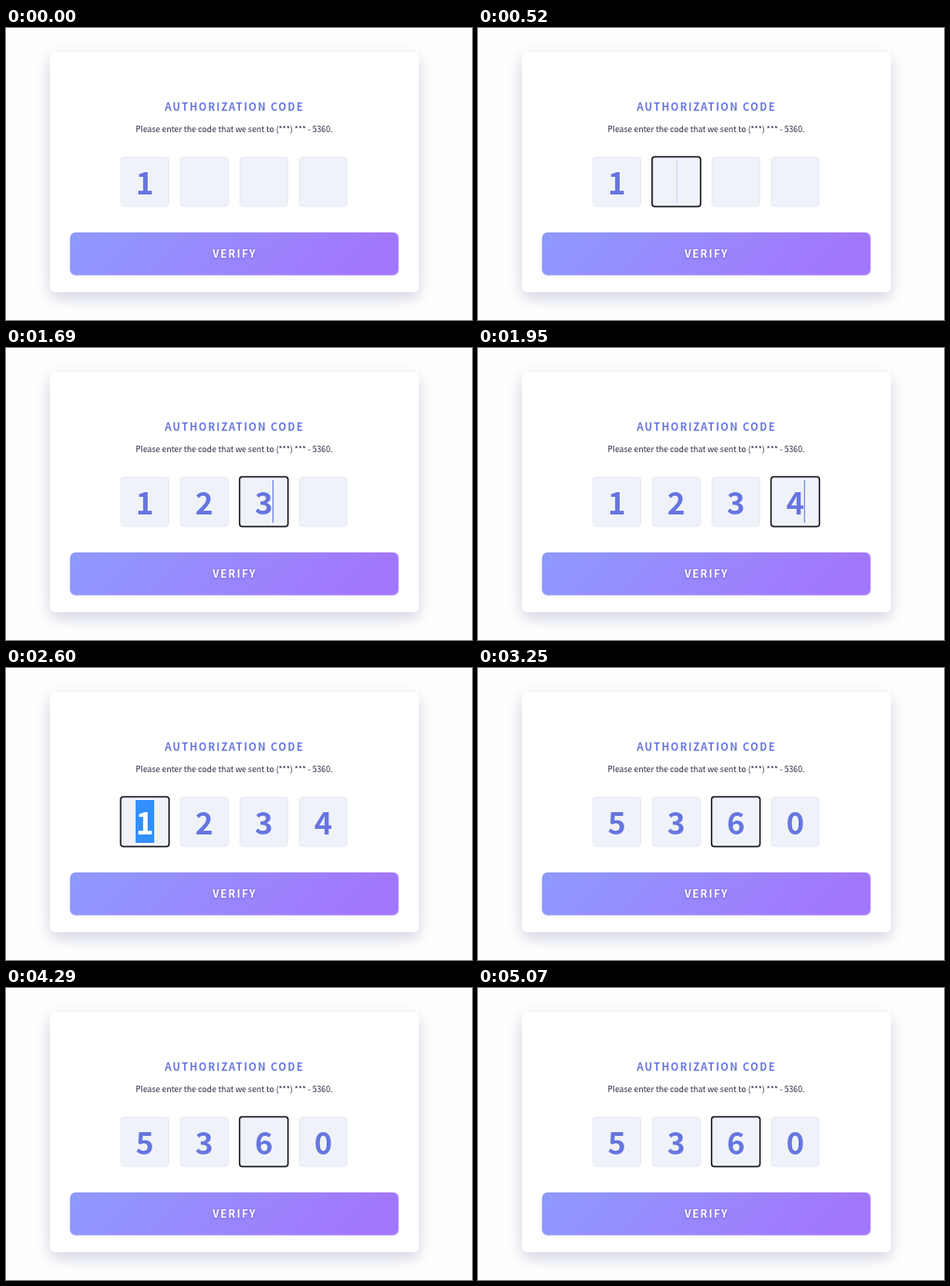
These frames come from a looping animation (500x314 px, 5.2 s). An HTML page:

```html
<!DOCTYPE html>
<html lang="en">
<head>
<meta charset="utf-8">
<title>Authorization code</title>
<style>
  html, body { margin: 0; width: 100%; height: 100%; overflow: hidden; background: #fefefe; }
  svg { display: block; width: 500px; height: 314px; }
  text { font-family: "Noto Sans CJK SC", "Noto Sans CJK JP", "Noto Sans CJK", "Open Sans", sans-serif; text-anchor: middle; }
  .card { fill: #fff; filter: drop-shadow(0 7px 8px rgba(50, 60, 130, .15)) drop-shadow(0 3px 9px rgba(50, 60, 130, .08)); }
  .title { font-size: 11px; font-weight: 700; letter-spacing: 1.5px; fill: #6675df; }
  .hint { font-size: 8.7px; fill: #2b2941; }
  .verify { font-size: 11px; font-weight: 900; letter-spacing: 1.65px; fill: #fff; filter: drop-shadow(0 1px 1px rgba(40, 30, 120, .35)); }
  .button { filter: drop-shadow(0 1px 1px rgba(80, 70, 180, .15)); }
  .box { fill: #eff3f9; stroke: #e3e8f1; }
  .focus .box { stroke: #121218; stroke-width: 1.5; }
  .digit { font-size: 32.8px; font-weight: 900; fill: #6675df; }
  .caret { fill: #6675df; }
  .selection { fill: #338fff; visibility: hidden; }
  .selected .selection { visibility: visible; }
  .selected .digit { fill: #fff; }
</style>
</head>
<body>
<svg viewBox="0 0 500 314">
  <defs>
    <linearGradient id="violet" x1="0" y1="0" x2="1" y2=".12">
      <stop offset="0" stop-color="#8e9aff"/>
      <stop offset="1" stop-color="#a376fc"/>
    </linearGradient>
  </defs>
  <rect class="card" x="47" y="26" width="396" height="258" rx="6"/>
  <text class="title" x="245.2" y="89">AUTHORIZATION CODE</text>
  <text class="hint" x="244.7" y="111.5">Please enter the code that we sent to (***) *** - 5360.</text>
  <g id="boxes"></g>
  <rect class="button" x="68.7" y="219.7" width="352.5" height="46" rx="6" fill="url(#violet)"/>
  <text class="verify" x="245.3" y="247">VERIFY</text>
  <path id="pointer" d="M0 0V10L2.3 8L4 11.2L5.5 10.4L4 7.4H7Z" fill="#fff" stroke="#62607a" stroke-width=".8"/>
</svg>
<script>
const LOOP = 5200, TICK = 130;

// Start time, entered code, focused box, caret opacity, whether the digit is selected
const states = [
  [0, "1", -1, 0],
  [130, "1", 1, 0],
  [260, "1", 1, 1],
  [520, "1", 1, 0.25],
  [1170, "12", 1, 1],
  [1430, "12", 2, 1],
  [1690, "123", 2, 1],
  [1820, "123", 3, 1],
  [1950, "1234", 3, 1],
  [2470, "1234", 0, 0],
  [2600, "1234", 0, 0, true],
  [3250, "5360", 2, 0],
  [3380, "5360", 2, 1],
  [3900, "5360", 2, 0],
  [4550, "5360", 2, 1],
  [5070, "5360", 2, 0]
];
const pointerMove = { start: 3900, end: 4290, x: 267, y: 210, dx: 2, dy: 44 };

const pointer = document.getElementById("pointer");

function add(parent, tag, attributes) {
  const node = document.createElementNS("http://www.w3.org/2000/svg", tag);
  for (const key in attributes) node.setAttribute(key, attributes[key]);
  return parent.appendChild(node);
}

const boxes = [0, 1, 2, 3].map(i => {
  const center = 149 + i * 63.8;
  const group = add(document.getElementById("boxes"), "g", {});
  const frame = add(group, "rect", { class: "box", rx: 3 });
  add(group, "rect", { class: "selection", x: center - 10, y: 142, width: 20, height: 46 });
  const digit = add(group, "text", { class: "digit", x: center, y: 178.5 });
  const caret = add(group, "rect", { class: "caret", y: 142, width: 1, height: 46 });
  return { center, group, frame, digit, caret };
});

function drawBox(box, digit, focused, caretOpacity, selected) {
  const { center, group, frame, caret } = box;
  const grow = focused ? 0.5 : 0;
  group.setAttribute("class", (focused ? "focus" : "") + (selected ? " selected" : ""));
  frame.setAttribute("x", center - 25.5 - grow);
  frame.setAttribute("y", 139 - grow);
  frame.setAttribute("width", 51 + 2 * grow);
  frame.setAttribute("height", 52.5 + 2 * grow);
  box.digit.textContent = digit;
  caret.setAttribute("x", center + (digit ? 9.4 : 0));
  caret.setAttribute("opacity", focused ? caretOpacity : 0);
}

function draw(now) {
  const time = now % LOOP;
  const [, code, focus, caret, selected] = states.filter(state => state[0] <= time).pop();
  boxes.forEach((box, i) =>
    drawBox(box, code[i] || "", i === focus, caret, selected && i === focus));

  const { start, end, x, y, dx, dy } = pointerMove;
  const step = Math.floor((time - start) / TICK);
  pointer.setAttribute("visibility", time >= start && time < end ? "visible" : "hidden");
  pointer.setAttribute("transform", `translate(${x + dx * step} ${y + dy * step})`);
}

const began = performance.now();
function tick() {
  draw(performance.now() - began);
  requestAnimationFrame(tick);
}
tick();
</script>
</body>
</html>
```
